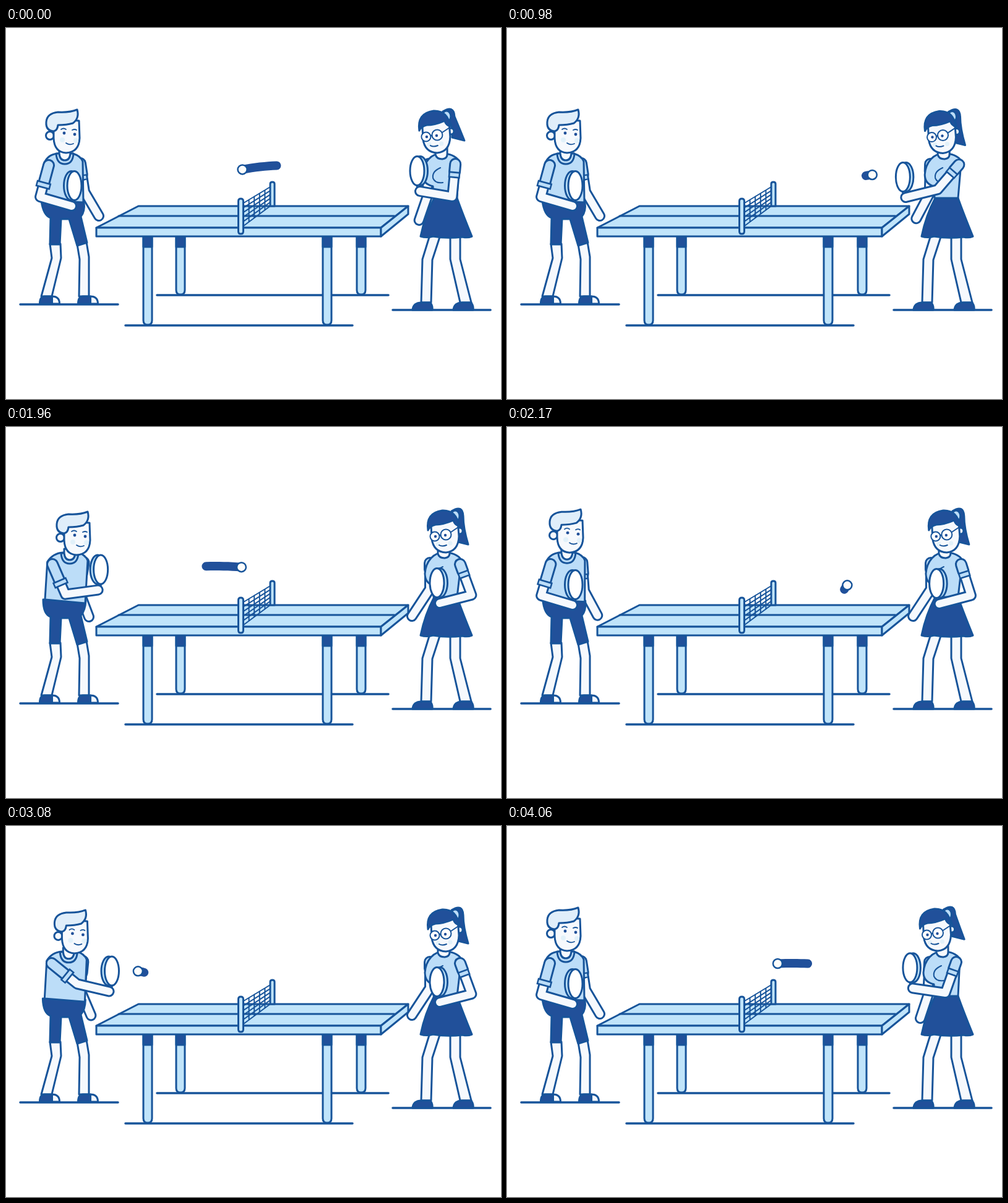
These frames come from a looping animation (800 px wide and 600 px high, 4.13 s). An HTML page:

```html
<!DOCTYPE html>
<html lang="en">
<head>
<meta charset="utf-8">
<title>Table tennis</title>
<style>
html, body { margin: 0; width: 100%; height: 100%; overflow: hidden; background: #fff; }
svg { display: block; width: 100vw; height: 100vh; }
</style>
</head>
<body>
<svg id="stage" viewBox="0 0 800 600" fill="none" stroke="#17549a" stroke-width="3" stroke-linecap="round" stroke-linejoin="round">
  <g id="scene"></g>
  <g id="boy"></g>
  <g id="girl"></g>
  <g id="ball"></g>
</svg>
<script>
const LOOP = 4130, STEP = 70, RALLY = 1365, TRAIL = 35, GIRL_DELAY = 735;
const INK = '#17549a', DARK = '#21509a', TABLE = '#c0e4fa', SHIRT = '#bcddf8', SKIN = '#f6f9fd', HAIR = '#e0eefa', BLUSH = '#e2f1fa';

const byId = id => document.getElementById(id);
const path = (d, fill = 'none', more = '') => `<path d="${d}" fill="${fill}" ${more}/>`;
const line = (points, color, width, cap = 'round') =>
  path('M' + points.map(p => p.join(' ')).join('L'), 'none', `stroke="${color}" stroke-width="${width}" stroke-linecap="${cap}"`);
const dot = (x, y, r, fill, more = '') => `<circle cx="${x}" cy="${y}" r="${r}" fill="${fill}" ${more}/>`;
const oval = (x, y, rx, ry, fill) => `<ellipse cx="${x}" cy="${y}" rx="${rx}" ry="${ry}" fill="${fill}"/>`;
const tube = (points, width, fill) => line(points, INK, width) + line(points, fill, width - 6);
const group = (x, y, body) => `<g transform="translate(${x} ${y})">${body}</g>`;
const thin = 'stroke-width="2"', plain = 'stroke="none"';

const lerp = (a, b, k) => a + (b - a) * k;
const mix = (a, b, k) => [lerp(a[0], b[0], k), lerp(a[1], b[1], k)];
const wrap = t => (t % RALLY + RALLY) % RALLY;
const ramp = (t, from, to) => {
  const k = Math.min(1, Math.max(0, (t - from) / (to - from)));
  return k * k * (3 - 2 * k);
};

/* Scenery */

function tableLeg(x, bottom) {
  return path(`M${x} 337V${bottom - 7}q0 7 7 7t7 -7V337Z`, TABLE) +
    path(`M${x} 337h14v17h-14Z`, DARK);
}

function netGrid() {
  let d = '';
  for (let k = 0; k <= 1; k += 0.2) {
    const x = lerp(384, 427, k);
    d += `M${x} ${lerp(283, 257, k)}V${lerp(320, 288, k)}`;
    d += `M384 ${lerp(283, 320, k)}L427 ${lerp(257, 288, k)}`;
  }
  return path(d, 'none', thin);
}

function scenery() {
  return path('M23 447H181M244 432H618M193 481H560M625 456H783', 'none', 'stroke-width="3.5"') +
    tableLeg(275, 431) + tableLeg(567, 431) +
    tableLeg(222, 480) + tableLeg(512, 480) +
    path('M214 288H650L606 323H146Z', TABLE) +
    path('M146 323H606V337H146Z', TABLE) +
    path('M606 323L650 288V301L606 337Z', TABLE) +
    path('M182 304H628') +
    path('M427 288V252q0 -3 3.5 -3t3.5 3V288Z', TABLE) +
    netGrid() +
    path('M375.5 329V280q0 -4 4 -4t4 4V329q0 4 -4 4t-4 -4Z', TABLE);
}

/* Swing: the racket goes out low and comes back high, the body follows later */

function swingAt(time) {
  const t = wrap(time);
  const reach = ramp(t, 40, 300) - ramp(t, 505, 755);
  const lean = ramp(t, 40, 480) - ramp(t, 600, 900);
  const arc = 4 * reach * (1 - reach) * (t < 400 ? 1 : -1);
  return { reach, lean, arc };
}

function batAt({ reach, arc }, rest, out) {
  const [x, y] = mix(rest, out, reach);
  return [x, y + 12 * arc];
}

/* Elbow of an arm with two equal bones */
function elbowOf([sx, sy], [hx, hy], side) {
  const dx = hx - sx, dy = hy - sy, reach = Math.hypot(dx, dy);
  const bend = side * Math.sqrt(Math.max(0, 53 * 53 - reach * reach / 4)) / reach;
  return [(sx + hx) / 2 - dy * bend, (sy + hy) / 2 + dx * bend];
}

/* People */

function sleevedArm(shoulder, elbow, hand, cuffAt, band) {
  const cuff = mix(shoulder, elbow, cuffAt);
  const near = d => mix(shoulder, elbow, cuffAt + d);
  return tube([cuff, elbow, hand], 18, SKIN) +
    tube([shoulder, near(-0.1)], 20, SHIRT) +
    line([near(-0.1), near(0.1)], INK, band, 'butt') +
    line([near(-0.05), near(0.05)], SHIRT, band - 5, 'butt');
}

function racketArm(shoulder, [x, y], side, cuffAt, band) {
  const hand = [x - side * 2, y + 33];
  return tube([[x, y + 20], [hand[0] + side, hand[1] + 2]], 9, SKIN) +
    oval(x - side * 2.5, y, 12, 23.5, TABLE) +
    oval(x + side * 2.5, y, 11.5, 23.5, '#fff') +
    sleevedArm(shoulder, elbowOf(shoulder, hand, side), hand, cuffAt, band);
}

function boyHead() {
  return dot(71, 174, 6.5, SKIN) +
    path('M77 158V178Q78 201 97 202Q118 201 119 178L118 150L82 148Z', SKIN) +
    path('M77 167Q64 166 65 152Q66 138 84 136Q103 137 115 132Q119 146 108 154Q98 157 84 157Q83 166 77 167Z', HAIR) +
    dot(91, 181, 4, BLUSH, plain) + dot(113, 182, 4, BLUSH, plain) +
    dot(94, 170, 2.4, DARK, plain) + dot(111, 172, 2.4, DARK, plain) +
    path('M89 164q4 -3 8 0M107 165q4 -2 7 0M97 186Q102 190 109 187', 'none', 'stroke-width="1.8"');
}

function boyLegs() {
  const shoe = x => path(`M${x + 20} 434q12 0 12 12h-12Z`, SKIN) +
    path(`M${x} 446q0 -12 8 -12h12v12Z`, DARK);
  return path('M71 349L74 372L57 434H74L89 372L88 349Z', SKIN) +
    path('M115 350L119 374L118 434H134V370L130 346Z', SKIN) + shoe(54.5) + shoe(116.5);
}

function drawBoy(swing) {
  const { lean } = swing, top = 8 * lean, hip = 3 * lean;
  const bat = batAt(swing, [108, 255], [168.5, 234.5]);
  return sleevedArm([120 + top * 0.7, 219], [127 - 9 * lean, 265], [150 - 16 * lean, 304 + 3 * lean], 0.5, 17) +
    boyLegs() +
    path(`M${57 + hip} 279Q60 303 72 307L71 350H87L89 309H102L115 352L131 347L121 305Q128 297 ${126 + hip} 281Z`, DARK) +
    path(`M${62 + top * 0.6} 218Q${68 + top} 204 ${84 + top} 203H${108 + top}Q${121 + top} 207 ${124 + top} 216L${125 + hip} ${282 + hip}L${60 + hip} 279Z`, SHIRT) +
    group(top, lean,
      path('M81 203Q82 220 95 220Q108 220 109 203Z', SHIRT) +
      path('M86 196V203Q87 214 95 214Q103 214 104 203V196Z', SKIN)) +
    group(17 * lean, 5 * lean, boyHead()) +
    racketArm([69 + 6 * lean, 222], bat, 1, 0.62, 24);
}

function girlHead(toss) {
  const tipX = 733 + 8 * toss, tipY = 189 - 7 * toss;
  return path(`M706 135Q724 124 725 143Q${tipX - 8} 162 ${tipX} ${tipY}L${tipX - 20} ${tipY - 5}Q723 160 716 150Z`, DARK) +
    oval(712, 143, 7, 9, SHIRT) +
    dot(719, 167, 5, SKIN) +
    path('M673 158L674 180Q677 201 697 202Q717 200 718 176L716 150L684 146Z', SKIN) +
    path('M668 166Q664 138 691 134Q714 133 718 159Q711 157 709 150Q693 157 680 157Q671 159 668 166Z', DARK) +
    dot(684, 188, 3.5, BLUSH, plain) + dot(704, 187, 3.5, BLUSH, plain) +
    dot(679, 176, 7.5, '#fff', thin) + dot(697, 173, 8.5, '#fff', thin) +
    dot(680, 176, 2.2, DARK, plain) + dot(696, 174, 2.2, DARK, plain) +
    path('M686.5 175q1 -2 2 -1M705 169L717 161M686 190Q691 193 698 190', 'none', thin);
}

function girlLegs() {
  const shoe = x => path(`M${x} 456Q${x + 1} 444 ${x + 15} 444H${x + 29}Q${x + 33} 450 ${x + 32} 456Z`, DARK);
  return path('M685 335L673 374L671 444H687L689 375L702 335Z', SKIN) +
    path('M718 335V374L734 444H752L734 374V335Z', SKIN) + shoe(657) + shoe(723);
}

function drawGirl(swing) {
  const { lean, arc } = swing, top = 4 * (1 - lean);
  const bat = batAt(swing, [699, 252], [635, 234]);
  return sleevedArm([683 + top * 0.5, 220], [685 - 5 * lean, 262 + 13 * lean], [656 + 12 * lean, 306 + 5 * lean], 0.35, 17) +
    girlLegs() +
    path('M692 275H729Q739 303 753 337Q746 340 738 338Q712 341 690 337Q680 340 670 337Q677 303 692 275Z', DARK) +
    path(`M${683 + top} 212Q${691 + top} 203 ${704 + top} 203Q${724 + top} 203 ${732 + top} 215L729 275H691L690 256Q${673 + top} 252 ${673 + top} 237Q${674 + top} 222 ${683 + top} 212Z`, SHIRT) +
    group(top, 0,
      path('M702 226Q688 232 690 243Q694 252 706 250', 'none', thin) +
      path('M694 196V205Q696 212 705 212Q713 211 713 204V194Z', SKIN)) +
    group(14 - 14.5 * lean, 1 - lean, girlHead(Math.max(0, -arc))) +
    racketArm([734 - 8 * lean, 222 - 2 * lean], bat, -1, 0.33, 19);
}

/* Ball: each flight is timed from the moment it crosses the net */

const toGirl = { side: 1, cross: 607, lead: 140, drop: 3 };
const toBoy = { side: -1, cross: 1354, lead: 260, drop: 0 };
const REACH = 228, SPEED = 1.63, BOUNCE = 85;

function ballAt(time) {
  const hit = toGirl.cross - toGirl.lead;
  const t = hit + wrap(time - hit);
  const { side, cross, lead, drop } = t < toBoy.cross - toBoy.lead ? toGirl : toBoy;
  const s = t - cross, after = s - BOUNCE;
  let along, y;
  if (after < 0) {
    const push = s < 0 ? (SPEED * lead - REACH) / lead ** 2 : 0;
    along = SPEED * s + push * s * s;
    const e = along + 60;
    y = 222 + 0.0009 * e * e + 0.000003 * e ** 3;
  } else {
    along = SPEED * BOUNCE + 0.05 * after + 0.00045 * after * after;
    y = 234 + 45 * Math.max(0, 1 - after / 320) ** 2;
  }
  return [400 + side * along, y + drop];
}

function drawBall(t) {
  const trail = Array.from({ length: 9 }, (_, i) => ballAt(t - TRAIL * i / 8));
  return line(trail, DARK, 14) + dot(...trail[0], 7.5, '#fdfdfb', 'stroke-width="2.5"');
}

function render(time) {
  const t = Math.floor(time % LOOP / STEP) * STEP;
  byId('boy').innerHTML = drawBoy(swingAt(t));
  byId('girl').innerHTML = drawGirl(swingAt(t - GIRL_DELAY));
  byId('ball').innerHTML = drawBall(t);
}

byId('scene').innerHTML = scenery();
const begin = performance.now();
function tick() {
  render(performance.now() - begin);
  requestAnimationFrame(tick);
}
tick();
</script>
</body>
</html>
```
